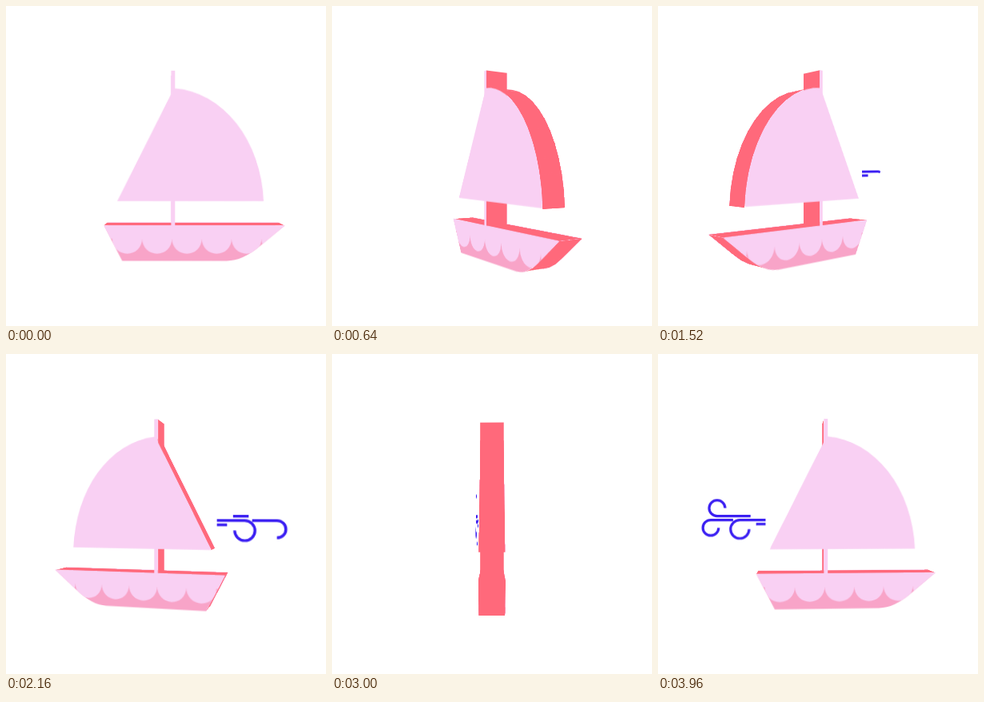
These frames come from a looping animation (400 by 400 pixels, 4000 ms). An HTML page without scripts:

```html
<!DOCTYPE html>
<html lang="en">
<head>
<meta charset="utf-8">
<title>Sailing boat</title>
<style>
  :root { --pink: #f9d0f3; --rose: #f8a4c8; --red: #ff697b; --blue: #3a1ef2; }
  html, body { margin: 0; width: 100%; height: 100%; overflow: hidden; background: #fff; }
  .stage { position: relative; width: 400px; height: 400px; overflow: hidden; perspective: 567px; }
  .boat, .arc { position: absolute; width: 0; height: 0; transform-style: preserve-3d; }
  .boat { left: 200px; top: 200px; animation: turn 4s linear infinite; }
  @keyframes turn { from { transform: rotateY(0deg); } to { transform: rotateY(-360deg); } }

  svg { position: absolute; display: block; }
  .defs { width: 0; height: 0; }
  .face { left: -160px; top: -120px; width: 320px; height: 240px; transform: translateZ(15px); }
  .back { transform: translateZ(-15px); }
  #side { fill: var(--pink); }
  #side .base { fill: var(--rose); }

  /* side walls: each runs clockwise along one edge of the outline */
  i {
    position: absolute; left: 0; top: -15px; width: var(--w); height: 30px;
    background: var(--red); backface-visibility: hidden; transform-origin: 0 50%;
    transform: translate(var(--x), var(--y)) rotate(var(--a)) rotateX(90deg);
  }
  /* rounded sail edge: equal strips on a circle, squeezed sideways; they overlap to hide seams */
  .arc { left: 0; top: 0; transform: translate(4.75px, 50.35px) scale(.788, 1); }
  .arc i {
    left: -10px; width: 20px; transform-origin: 50% 50%;
    transform: rotate(calc(6.5deg + var(--k) * 7deg)) translateY(-145px) rotateX(90deg);
  }

  .wind {
    left: -150px; top: -30px; width: 90px; height: 65px; transform: translateZ(-15px);
    fill: none; stroke: var(--blue); stroke-width: 3.2;
  }
  .wind path { stroke-dasharray: 1 2; animation: 4s linear infinite; }
  .wind .low { animation-name: low; }
  .wind .near { animation-name: near; }
  .wind .far { animation-name: far; }
  .wind .high { animation-name: high; }
  @keyframes low { 0%, 28.5% { stroke-dashoffset: 1.02; } 37%, 100% { stroke-dashoffset: 0; } }
  @keyframes near { 0%, 28.5% { stroke-dashoffset: 1.02; } 50%, 100% { stroke-dashoffset: 0; } }
  @keyframes far { 0%, 38.2% { stroke-dashoffset: 1.02; } 58%, 100% { stroke-dashoffset: 0; } }
  @keyframes high { 0%, 49% { stroke-dashoffset: 1.02; } 72%, 100% { stroke-dashoffset: 0; } }
</style>
</head>
<body>
<svg class="defs">
  <defs>
    <path id="hull" d="M-75.5 72.4H144.6L114 97.8Q93.1 115.4 74 115.4H-53.3Z"/>
    <clipPath id="cut"><use href="#hull"/></clipPath>
    <g id="side">
      <use class="base" href="#hull"/>
      <path clip-path="url(#cut)" d="M-81 72V88.6h15.7
        a18.15 18.15 0 0 0 36.3 0a18.15 18.15 0 0 0 36.3 0a18.15 18.15 0 0 0 36.3 0
        a18.15 18.15 0 0 0 36.3 0a18.15 18.15 0 0 0 36.3 0a18.15 18.15 0 0 0 36.3 0V72Z"/>
      <path d="M6.3 -115.9H11V73H6.3Z"/>
      <path d="M-59.3 42.8L9.7 -94.4H10.7A114.2 145 0 0 1 118.8 42.8Z"/>
    </g>
  </defs>
</svg>

<div class="stage">
  <div class="boat">
    <svg class="face" viewBox="-160 -120 320 240"><use href="#side"/></svg>
    <svg class="face back" viewBox="-160 -120 320 240"><use href="#side"/></svg>

    <!-- mast -->
    <i style="--x:6.3px;--y:73.1px;--a:-90deg;--w:189px"></i>
    <i style="--x:11px;--y:-115.9px;--a:90deg;--w:189px"></i>

    <!-- sail -->
    <i style="--x:-59.3px;--y:42.8px;--a:-63.3deg;--w:153px"></i>
    <div class="arc">
      <i style="--k:0"></i><i style="--k:1"></i><i style="--k:2"></i><i style="--k:3"></i>
      <i style="--k:4"></i><i style="--k:5"></i><i style="--k:6"></i><i style="--k:7"></i>
      <i style="--k:8"></i><i style="--k:9"></i><i style="--k:10"></i><i style="--k:11"></i>
    </div>

    <!-- hull: deck, bow, rounded keel, stern -->
    <i style="--x:-75.5px;--y:72.4px;--a:0deg;--w:220px"></i>
    <i style="--x:144.6px;--y:72.4px;--a:140.3deg;--w:41px"></i>
    <i style="--x:114px;--y:97.8px;--a:142.9deg;--w:14px"></i>
    <i style="--x:103.7px;--y:105.6px;--a:152deg;--w:12px"></i>
    <i style="--x:93.6px;--y:111px;--a:161.5deg;--w:11px"></i>
    <i style="--x:83.7px;--y:114.3px;--a:173.5deg;--w:10px"></i>
    <i style="--x:-53.3px;--y:115.4px;--a:-117.3deg;--w:49px"></i>

    <svg class="wind" viewBox="-150 -30 90 65">
      <path class="low" pathLength="1" d="M-66 12.8h-12"/>
      <path class="near" pathLength="1" d="M-66 7.6H-98.5a11.7 11.7 0 1 0 11.7 11.7"/>
      <path class="far" pathLength="1" d="M-107 7.6H-135a9.8 9.8 0 1 0 9.8 9.8"/>
      <path class="high" pathLength="1" d="M-85 2.6H-127a10 10 0 1 1 10 -10"/>
    </svg>
  </div>
</div>
</body>
</html>
```
